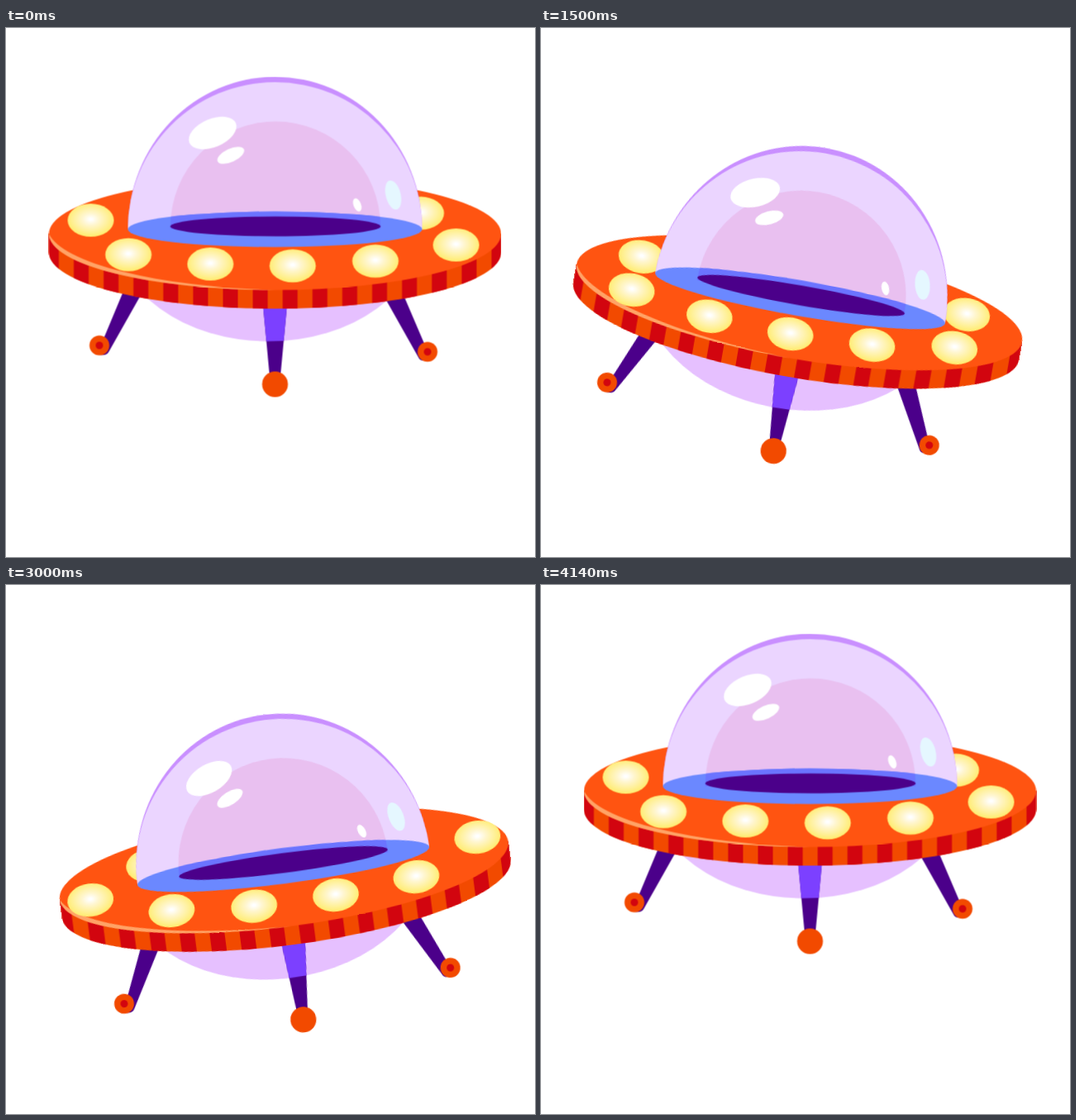
An HTML page without scripts that plays this animation: 640x640 px, repeating every 4210 ms.

```html
<!DOCTYPE html>
<html lang="en">
<head>
<meta charset="utf-8">
<title>Flying saucer</title>
<style>
  html, body { margin: 0; width: 100%; height: 100%; overflow: hidden; background: #fff; }
  svg { display: block; width: 100%; height: 100%; }

  .lilac { fill: #e6c0ff; }
  .dark { fill: #4b008a; }
  .violet { fill: #7c40ff; }
  .orange { fill: #f24a00; }
  .red { fill: #d2050f; }
  .white { fill: #fff; }

  .drift, .bob, .tilt, .light {
    animation: 4.21s cubic-bezier(.333, 0, .667, 1) infinite;
  }
  .drift { animation-name: drift; }
  .bob { animation-name: bob; }
  .tilt { animation-name: tilt; }

  /* Eight evenly spaced lights; each moves on to the next one's place per loop. */
  .light {
    fill: url(#glow);
    offset-path: path("M77 -27.4A241 30 0 0 1 241 1A241 43.4 0 0 1 0 44.4A243 43.4 0 0 1 -243 1A243 30 0 0 1 -124 -24.8");
    offset-rotate: 0deg;
    animation-name: advance;
  }

  @keyframes drift {
    0% { transform: translateX(325.5px); animation-timing-function: cubic-bezier(.333, .71, .667, .91); }
    35.6% { transform: translateX(313.5px); }
    46.3% { transform: translateX(307.3px); }
    76% { transform: translateX(337.6px); }
    98.3%, 100% { transform: translateX(325.5px); }
  }
  @keyframes bob {
    0% { transform: translateY(243.5px); animation-timing-function: cubic-bezier(.25, .1, .6, .97); }
    35.6% { transform: translateY(327px); }
    61%, 64.8% { transform: translateY(346.5px); animation-timing-function: cubic-bezier(.45, 0, .667, 1); }
    98.3%, 100% { transform: translateY(243.5px); }
  }
  @keyframes tilt {
    0% { transform: rotate(0deg); }
    28.5%, 33.2% { transform: rotate(10.3deg); }
    61.3%, 67% { transform: rotate(-8deg); }
    93%, 100% { transform: rotate(0deg); }
  }
  @keyframes advance {
    0% { offset-distance: calc(var(--i) * 12.5%); }
    27.1%, 59.4% { offset-distance: calc((var(--i) + .26) * 12.5%); }
    83.1%, 100% { offset-distance: calc((var(--i) + 1) * 12.5%); }
  }
</style>
</head>
<body>
<svg viewBox="0 0 640 640">
  <defs>
    <radialGradient id="glow" cy=".47" r=".53">
      <stop offset=".05" stop-color="#fff"/>
      <stop offset=".34" stop-color="#fff6cf"/>
      <stop offset="1" stop-color="#ffec6e"/>
    </radialGradient>
    <path id="bowl" d="M-194 0A186 135.5 0 0 0 178 0z"/>
    <ellipse id="base" rx="178" ry="21.5"/>
    <path id="rim" d="M-273.5 5.5V28A273.5 68 0 0 0 273.5 28V5.5z"/>
    <path id="strut" d="M-15.3 84H15.3L6.5 178H-6.5z"/>
    <path id="cabin" d="M-126.5 0V-3.5A127 127 0 0 1 127.5 -3.5V0z"/>
    <g id="foot">
      <circle class="orange" r="12"/>
      <circle class="red" r="4.5"/>
    </g>
    <clipPath id="inBowl"><use href="#bowl"/></clipPath>
    <clipPath id="inRim"><use href="#rim"/></clipPath>
    <clipPath id="inBase"><use href="#base"/></clipPath>
  </defs>

  <g class="drift"><g class="bob"><g class="tilt">
    <use href="#bowl" class="lilac"/>

    <!-- legs -->
    <path class="dark" d="M-181 69L-157 70L-201 148Q-204 153.5 -212 152L-214 141L-206 129z"/>
    <path class="dark" d="M129 76L153.5 75L180 137L184 156Q177 162 173.5 155z"/>
    <use href="#strut" class="dark"/>
    <g clip-path="url(#inBowl)"><use href="#strut" class="violet"/></g>
    <use href="#foot" x="-212.5" y="140.5"/>
    <use href="#foot" x="184.5" y="148.3"/>
    <circle class="orange" cy="187.5" r="15.6"/>

    <!-- disc -->
    <use href="#rim" class="orange"/>
    <g clip-path="url(#inRim)">
      <path d="M-279.6 50H300" stroke="#d2050f" stroke-width="110" stroke-dasharray="18.05"/>
    </g>
    <ellipse cy="5.5" rx="273.5" ry="68" fill="#ff5411"/>
    <path fill="#ffa366" d="M-273.5 5.5A273.5 68 0 0 0 0 73.5A312 77.5 0 0 1 -273.5 5.5z"/>

    <ellipse class="light" rx="28" ry="20" style="--i: 0"/>
    <ellipse class="light" rx="28" ry="20" style="--i: 1"/>
    <ellipse class="light" rx="28" ry="20" style="--i: 2"/>
    <ellipse class="light" rx="28" ry="20" style="--i: 3"/>
    <ellipse class="light" rx="28" ry="20" style="--i: 4"/>
    <ellipse class="light" rx="28" ry="20" style="--i: 5"/>
    <ellipse class="light" rx="28" ry="20" style="--i: 6"/>
    <ellipse class="light" rx="28" ry="20" style="--i: 7"/>

    <!-- dome -->
    <path fill="#c98fff" d="M-178 0A178 184.5 0 0 1 178 0z"/>
    <path fill="#ebd5ff" d="M-178 0A178 178 0 0 1 178 0z"/>
    <use href="#cabin" fill="#e9c0f0"/>
    <use href="#base" fill="#6b88ff"/>
    <g clip-path="url(#inBase)"><use href="#cabin" fill="#6b74ff"/></g>
    <ellipse class="dark" cx=".5" cy="-3.5" rx="127.3" ry="12"/>

    <!-- reflections -->
    <ellipse class="white" rx="30.5" ry="17" transform="translate(-75.5 -116.5) rotate(-23)"/>
    <ellipse class="white" rx="17.5" ry="8" transform="translate(-53.5 -89.5) rotate(-25)"/>
    <ellipse class="white" rx="4.5" ry="8.3" transform="translate(99.5 -29.5) rotate(-22)"/>
    <ellipse fill="#e5f7ff" rx="9" ry="18" transform="translate(143 -41.5) rotate(-14)"/>
  </g></g></g>
</svg>
</body>
</html>
```
